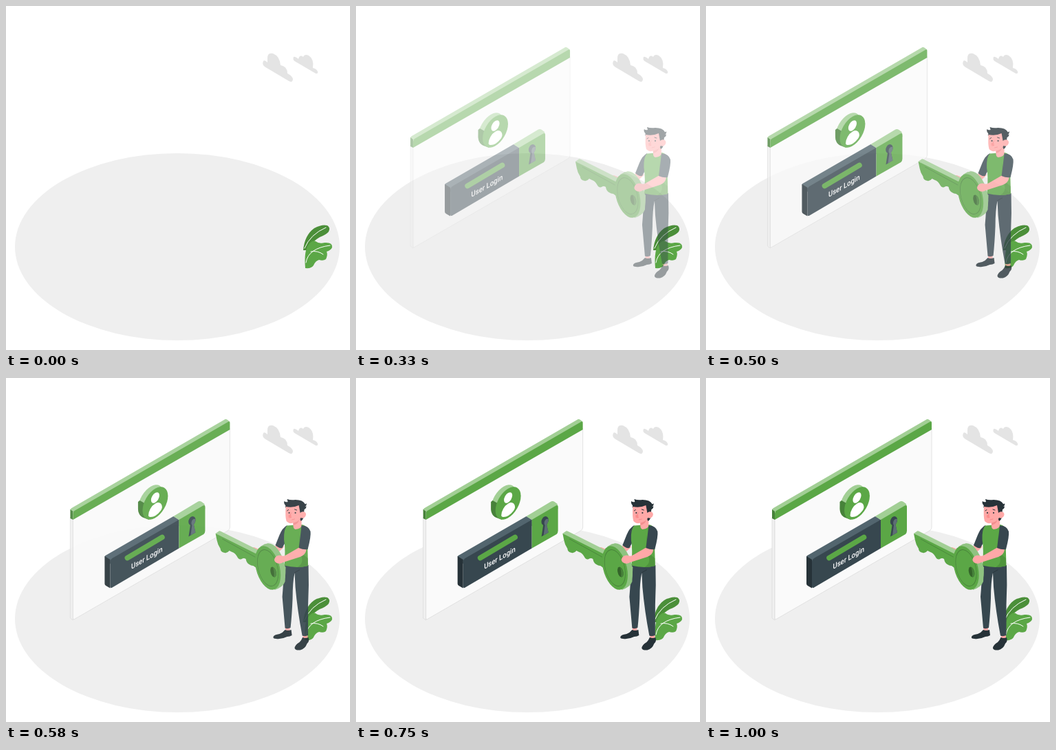
Recreate the animation shown at these times as an HTML page. Size 500 by 500 pixels, loop 1040 ms.

```html
<!DOCTYPE html>
<html lang="en">
<head>
<meta charset="utf-8">
<title>User login</title>
<style>
html, body { margin: 0; height: 100%; overflow: hidden; background: #fff; }
svg { display: block; width: 100%; height: 100%; }
.green { fill: #5ba746; }
.light { fill: #a2cf95; }
.deep { fill: #47823a; }
.slate { fill: #37474f; }
.ink { fill: #263238; }
.skin { fill: #ffa8a7; }
.line { fill: none; stroke-linecap: round; stroke-linejoin: round; }
text { font: 500 11px Roboto, Arial, sans-serif; fill: #fff; }
</style>
</head>
<body>
<svg viewBox="0 0 500 500">
  <ellipse cx="249" cy="350" rx="236" ry="136" fill="#efefef"/>

  <g id="clouds" fill="#e4e4e4">
    <path d="M374 80Q371 86 379 90L411 109Q416 112 417 107Q417 102 409 98Q409 88 399 86Q398 73 388 69Q380 67 380 76V82Q376 78 374 80Z"/>
    <path d="M418 74Q416 79 421 81L450 98Q454 99 453 95Q451 91 446 90Q448 77 440 72Q434 69 432 74Q427 70 425 77Q420 73 418 74Z"/>
  </g>

  <g id="plant">
    <path fill="#4b8f39" d="M432 355Q434 333 448 323Q459 317 467 319Q472 322 469 328Q466 332 456 336Q445 342 437 355Z"/>
    <path class="green" d="M435 381Q433 357 439 348Q445 339 450 342Q455 346 463 344Q475 343 474 351Q472 355 466 357Q468 361 465 368Q461 371 455 369Q450 370 447 377Q444 382 435 381Z"/>
    <g class="line" stroke="#fff" stroke-width="1">
      <path d="M434 352Q442 332 465 322M436 373Q439 352 471 348M443 357Q453 355 461 361"/>
    </g>
  </g>

  <g id="panel">
    <path d="M96 203L100 205V352L96 349Z" fill="#f0f0f0" stroke="#dcdcdc" stroke-width=".8"/>
    <path d="M100 205L328 74V217Q328 220 325 222L103 350Q100 352 100 349Z" fill="#fafafa" stroke="#dcdcdc" stroke-width=".8"/>
    <path class="light" d="M96 192Q96 190 98 189L321 60Q323 59 328 64L100 195Z"/>
    <path class="deep" d="M96 191L100 194V206L96 204Z"/>
    <path class="green" d="M100 197Q100 194 102 193L325 64Q328 62 328 65V75L100 206Z"/>

    <g id="avatar">
      <g transform="matrix(.866 -.5 0 1 213 179)"><circle class="light" r="21.3"/></g>
      <path class="deep" d="M194.500 188V180L197 178L204 182L203 193L211 206L205 204Q194 201 194.500 188Z"/>
      <g transform="matrix(.866 -.5 0 1 219.500 182)">
        <circle class="green" r="21.300"/>
        <g fill="#fff">
          <circle cy="-8" r="7"/>
          <path d="M-11.500 12a11.500 11.500 0 0 1 23 0Q11 14 9 15.500Q0 21 -9 15.500Q-11.500 14 -11.500 12Z"/>
        </g>
      </g>
    </g>

    <g id="field">
      <path fill="#52656e" d="M146 260Q146 258 149 257L246 201L254 206V215L154 270Z"/>
      <path class="light" d="M246 201L281 180Q284 178 287 180L291 183L292 190L254 212V206Z"/>
      <path class="ink" d="M146 259L154 264V305.500L148 302Q146 301 146 299Z"/>
      <path class="slate" d="M154 267Q154 264 157 262L254 206V247.500L157 304.500Q154 306 154 303Z"/>
      <path class="green" d="M254 206L289 185.500Q292 184 292 187V222Q292 225 290 227L254 247.500Z"/>
      <path class="line" stroke="#5ba746" stroke-width="7.600" d="M179 261.500L229.500 231.500"/>
      <text transform="matrix(.866 -.5 0 1 184.500 278.300)">User Login</text>
      <path class="slate" d="M270.500 214Q267 212 268 207Q270 201 274 201Q279 202 278 208Q277 211 275.500 213L278 224.500L268 230.500Z"/>
      <path fill="#5d6d75" d="M273 214Q271 211 273 207Q275 204 278 205Q278 210 275.500 213L278 224.500L271 228.500Z"/>
    </g>
  </g>

  <g id="man">
    <g id="legs">
      <path class="skin" d="M403 361H410L410 368L404 368ZM428.500 371H436V379H429Z"/>
      <path class="ink" d="M386 376Q387 373 395 372Q400 370 403 366Q407 368 412 366L413 374Q410 376 406 376Q398 380 390 379Q385 379 386 376Z"/>
      <path class="ink" d="M417 393Q417 388 424 384Q427 381 428.500 377Q433 379 437 377Q439 383 435 386Q432 394 425 395.500Q418 396 417 393Z"/>
      <path class="slate" d="M402 270L437 272Q438 300 436.500 330L436.500 374Q432 376 428 374.500Q421 338 418 304L417 283Q414 297 414 320Q413 345 411 363Q407 365 403 363.500L399 318Q401 295 401 280Z"/>
      <path class="line" stroke="#263238" stroke-width=".8" d="M417 283Q420 281 424 279"/>
    </g>

    <path class="skin" d="M392 241L402 245Q396 252 386 258L376 257ZM351 249Q352 246 358 246L368 250L364 256L354 252Z"/>
    <path class="slate" d="M406 214Q399 218 395 228L389 243Q394 248 399 247L406 234Z"/>
    <path class="green" d="M406 214.500L427 213Q434 214 435 220L436.500 273Q420 277 402 272.500Q404 250 401.500 235Q401 219 406 214.500Z"/>
    <path fill="#4f943c" d="M424 228Q426 239 424 247L430 257L436 262V273Q428 275 421 275Q433 268 424 254Z"/>

    <g id="head">
      <path class="skin" d="M414 203L427 201V214Q427 219 418 220Q415 219 415 215Z"/>
      <path fill="#f28f8f" d="M415 210Q420 209 424 205Q422 213 415 214Z"/>
      <path class="ink" d="M403 188Q405 186 402 183Q401 180 402 179Q404 181 407 180L406 176Q411 178 418 177Q429 177 432 183Q433 184 434 182Q435 185 432 187Q434 187 434 186Q434 190 431 191L430 200Q430 206 426 208L421 196Z"/>
      <path class="skin" d="M404 187Q415 189 423 185Q424 190 425 196Q428 193 432 195Q435 198 432 202Q429 205 426 203Q424 208 417 210Q409 213 405 208Q403 202 404 187Z"/>
      <ellipse cx="410" cy="201" rx="2.400" ry="2.800" fill="#ff9594"/>
      <g class="ink"><circle cx="409" cy="196" r="1.100"/><circle cx="418" cy="196" r="1.100"/></g>
      <path class="line" stroke="#263238" stroke-width="1" d="M406 193L408 191.500M417 191L420 192"/>
      <path class="line" stroke="#f07f80" stroke-width=".7" d="M412 196L409.500 202L412 202.500M413 206L417 205"/>
    </g>

    <g id="key">
      <path class="light" d="M302 226L307 222.500Q308 222 310 223L366 251L364 264Z"/>
      <path class="green" d="M302 226L364 257L366 278Q360 276 357 273Q354 273 351 271Q347 269 346 263Q343 261 340 263Q336 265 333 259Q330 254 326 253L322 251Q319 255 315 254Q309 253 309 248Q305 242 304 236Z"/>
      <path class="line" stroke="#47823a" stroke-width=".8" d="M312 234L361 261"/>
      <g transform="matrix(.866 .5 0 1 385 272)"><ellipse fill="#8fc381" rx="21.500" ry="30"/></g>
      <path fill="#8fc381" d="M367 245L374 241L404 275L403 296Q400 304 388 308Z"/>
      <g transform="matrix(.866 .5 0 1 378 276)">
        <ellipse class="green" rx="21.500" ry="30"/>
        <ellipse class="line" stroke="#47823a" stroke-width=".9" rx="17.500" ry="25"/>
      </g>
      <g transform="matrix(.866 .5 0 1 386 282)">
        <ellipse fill="#34642a" rx="5" ry="7"/>
        <path fill="#47823a" d="M-1 -7Q6 -5 5 2Q3 7 1 6Q2 -2 -1 -7Z"/>
      </g>
    </g>

    <path class="skin" d="M424 246L434 249Q433 257 425 260L400 268Q396 271 391 269Q386 266 388 262Q391 257 397 258Q401 260 405 257Z"/>
    <path class="slate" d="M427 214.500Q437 214 440 223Q441 230 436 249Q430 250 423 247L425 232Z"/>
  </g>
</svg>
<script>
const LOOP = 1040, FPS = 24, SLIDE = 30;
const panel = document.getElementById('panel');
const man = document.getElementById('man');

const curve = (a, b, s) => 3 * (1 - s) ** 2 * s * a + 3 * (1 - s) * s * s * b + s ** 3;

// cubic-bezier(.36, -.01, .5, 1.38), solved by bisection
function ease(x) {
  let lo = 0, hi = 1;
  for (let i = 0; i < 24; i++) {
    const mid = (lo + hi) / 2;
    if (curve(.36, .5, mid) < x) lo = mid; else hi = mid;
  }
  return curve(-.01, 1.38, hi);
}

function place(group, x, alpha) {
  group.setAttribute('transform', `translate(${x.toFixed(2)} 0)`);
  group.setAttribute('opacity', alpha.toFixed(3));
}

function draw(ms) {
  // stepped at 24 pictures a second
  const step = Math.floor((ms % LOOP + 4) * FPS / 1000);
  const p = step < 2 ? 0 : ease(Math.min(1, step / FPS + .02));
  const alpha = Math.max(0, Math.min(1, p));
  place(panel, SLIDE * (p - 1), alpha);
  place(man, SLIDE * (1 - p), alpha);
}

const start = performance.now();
function tick() {
  draw(performance.now() - start);
  requestAnimationFrame(tick);
}
tick();
</script>
</body>
</html>
```
